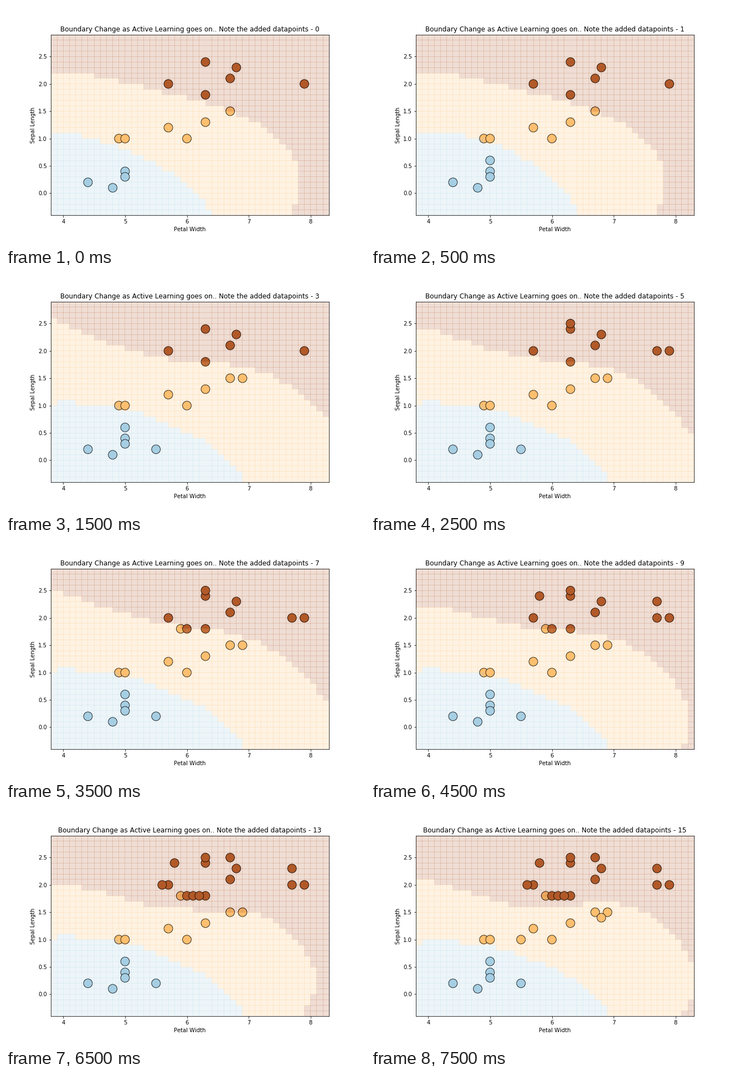
A matplotlib script that plays this animation: 648x432 px, repeating every 8000 ms.

```python
from itertools import combinations

import numpy as np
import matplotlib.pyplot as plt
from matplotlib.animation import FuncAnimation
from matplotlib.colors import ListedColormap

plt.rcParams["text.kerning_factor"] = 6

COLORS = np.array(["#a6cee3", "#fdbf6f", "#b15928"])
STEPS = 16
GAMMA = 0.5   # width of the radial kernel
LIMIT = 1.0   # largest weight of one point

# measurements in the order they are labelled; each step adds one
POINTS = np.array([
    (5.0, 0.4), (5.0, 0.3), (4.4, 0.2), (4.8, 0.1), (6.7, 1.5), (6.3, 1.3),
    (5.7, 1.2), (6.0, 1.0), (4.9, 1.0), (5.0, 1.0), (6.3, 2.4), (6.8, 2.3),
    (6.7, 2.1), (5.7, 2.0), (6.3, 1.8), (7.9, 2.0), (5.0, 0.6), (5.5, 0.2),
    (6.9, 1.5), (7.7, 2.0), (6.3, 2.5), (5.9, 1.8), (6.0, 1.8), (5.8, 2.4),
    (7.7, 2.3), (6.1, 1.8), (6.7, 2.5), (6.2, 1.8), (5.6, 2.0), (6.8, 1.4),
    (5.5, 1.0),
])
START = len(POINTS) - STEPS + 1

# two straight cuts separate the three kinds
KINDS = (POINTS[:, 1] > 0.8).astype(int) + (POINTS @ [1, 4] > 13.15)

xs = np.arange(38, 84) / 10
ys = np.arange(-4, 30) / 10
GRID = np.stack(np.meshgrid(xs[:-1], ys[:-1]), axis=-1).reshape(-1, 2)


def kernel(a, b):
    return np.exp(-GAMMA * ((a[:, None] - b[None]) ** 2).sum(axis=-1))


def fit(k, sign, tol=1e-4, eps=1e-9):
    """Two-class support vector machine: signed weights and bias."""
    low, high = np.minimum(0, sign * LIMIT), np.maximum(0, sign * LIMIT)
    w = np.zeros(len(sign))
    for _ in range(5000):
        score = sign - k @ w
        i = np.argmax(np.where(w < high - eps, score, -np.inf))
        j = np.argmin(np.where(w > low + eps, score, np.inf))
        gap = score[i] - score[j]
        if gap < tol:
            break
        move = min(gap / (k[i, i] + k[j, j] - 2 * k[i, j]),
                   high[i] - w[i], w[j] - low[j])
        w[i] += move
        w[j] -= move
    return w, (score[i] + score[j]) / 2


def regions(step):
    """Kind of every cell, by vote of the pairwise classifiers."""
    pts, kinds = POINTS[:START + step], KINDS[:START + step]
    votes = np.zeros((len(GRID), len(COLORS)))
    for a, b in combinations(range(len(COLORS)), 2):
        pair = (kinds == a) | (kinds == b)
        sub = pts[pair]
        w, bias = fit(kernel(sub, sub), np.where(kinds[pair] == a, 1.0, -1.0))
        first = kernel(GRID, sub) @ w + bias > 0
        votes[:, a] += first
        votes[:, b] += ~first
    return votes.argmax(axis=1).reshape(len(ys) - 1, len(xs) - 1)


AREAS = [regions(step) for step in range(STEPS)]

fig, ax = plt.subplots(figsize=(9, 6), dpi=72)
fig.subplots_adjust(left=0.125, right=0.9, bottom=0.125, top=0.88)
dots = ax.scatter(*POINTS.T, s=250, c=COLORS[KINDS],
                  edgecolors="black", linewidths=1)
# unsnapped cells overlap by a pixel, which gives the faint grid
mesh = ax.pcolormesh(xs, ys, AREAS[0], cmap=ListedColormap(COLORS),
                     vmin=0, vmax=2, alpha=0.2, snap=False)
ax.set_xlim(3.8, 8.3)
ax.set_ylim(-0.4, 2.9)
ax.set_xlabel("Petal Width")
ax.set_ylabel("Sepal Length")
title = ax.set_title("")


def draw(step):
    count = START + step
    dots.set_offsets(POINTS[:count])
    dots.set_facecolor(COLORS[KINDS[:count]])
    mesh.set_array(AREAS[step])
    title.set_text("Boundary Change as Active Learning goes on.. "
                   f"Note the added datapoints - {step}")
    return dots, mesh, title


anim = FuncAnimation(fig, draw, frames=STEPS, interval=500,
                     init_func=lambda: draw(0), repeat=True, repeat_delay=0)
plt.show()
```
